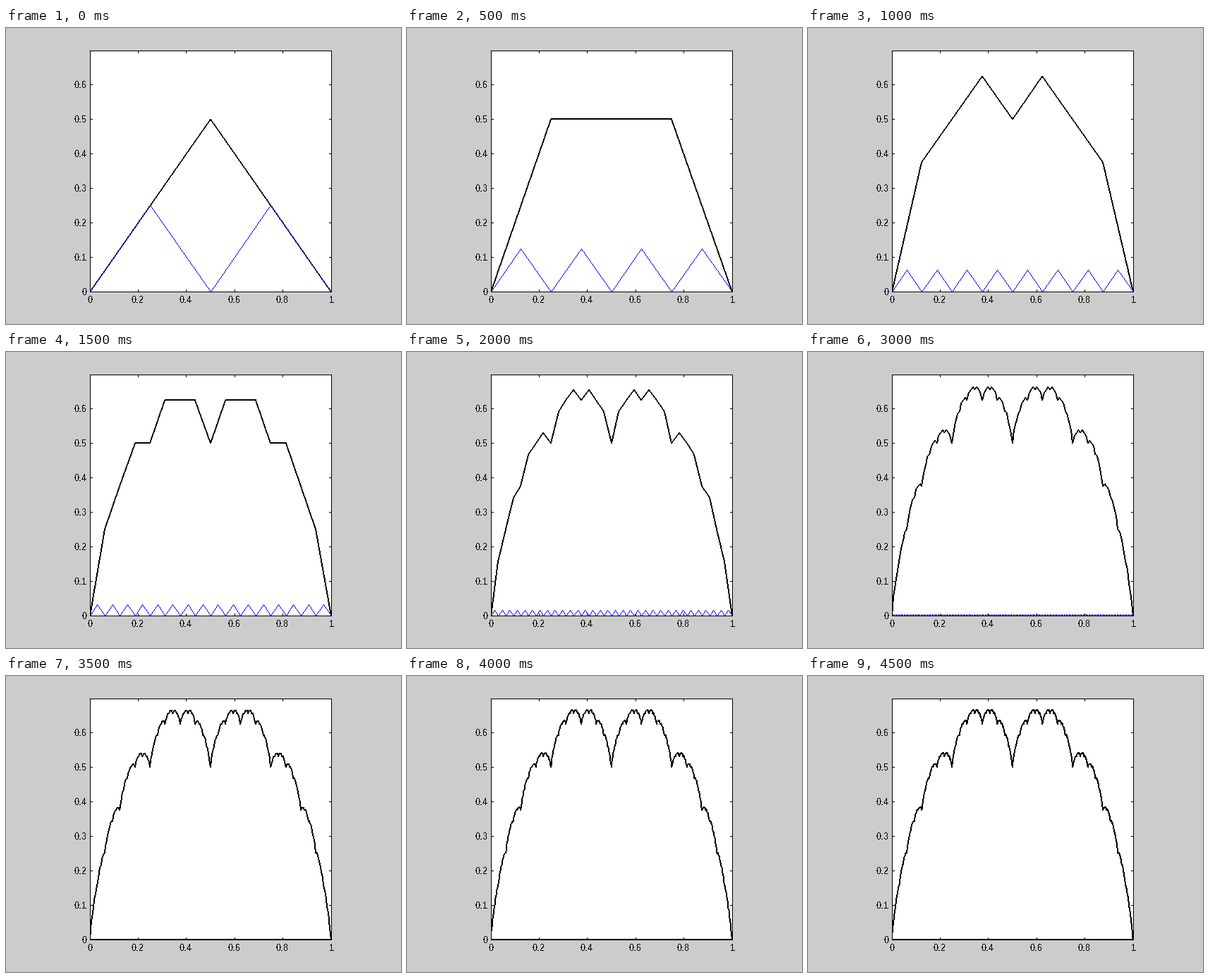
A matplotlib script that plays this animation: 560 by 420 pixels, repeating every 5000 ms.

```python
import numpy as np
import matplotlib.pyplot as plt
from matplotlib.animation import FuncAnimation

W, H, DPI = 560, 420, 96
LEFT, RIGHT, TOP, BOTTOM = 119, 461, 32, 374  # pixel lines of the axes box
TICK = 3
STEPS = 10
GREY, WHITE, BLACK, BLUE = (204,) * 3, (255,) * 3, (0,) * 3, (0, 0, 255)

plt.rcParams.update({
    "font.family": "Liberation Sans",
    "font.size": 13 * 72 / DPI,
    "text.antialiased": False,
    "text.hinting": "no_autohint",
    "text.hinting_factor": 1,
})


def to_px(x, y):
    """Pixel column and row of a data point."""
    col = np.floor(118.55 + 342.2 * np.asarray(x) + 0.5)
    row = np.floor(373.6 - 342 / 0.7 * np.asarray(y) + 0.5)
    return col.astype(int), row.astype(int)


def wave(x, n):
    """n-th triangle wave of the blancmange series."""
    t = x * 2**n
    return np.abs(t - np.round(t)) / 2**n


def plot(img, x, y, color, thick=False):
    """Draw a polyline without smoothing, one or two pixels wide."""
    cols, rows = to_px(x, y)
    for x0, y0, x1, y1 in zip(cols, rows, cols[1:], rows[1:]):
        dx, dy = x1 - x0, y1 - y0
        t = np.linspace(0, 1, max(abs(dx), abs(dy)) + 1)
        c = np.floor(x0 + dx * t + 0.5).astype(int)
        r = np.floor(y0 + dy * t + 0.5).astype(int)
        img[r, c] = color
        if thick and abs(dy) > abs(dx):
            img[r, np.maximum(c - 1, LEFT)] = color
        elif thick:
            img[r - 1, c] = color


def draw_box(img):
    img[[TOP, BOTTOM], LEFT:RIGHT + 1] = BLACK
    img[TOP:BOTTOM + 1, [LEFT, RIGHT]] = BLACK
    for c in xcols:
        img[TOP:TOP + TICK + 1, c] = BLACK
        img[BOTTOM - TICK:BOTTOM + 1, c] = BLACK
    for r in yrows:
        img[r, LEFT:LEFT + TICK + 1] = BLACK
        img[r, RIGHT - TICK:RIGHT + 1] = BLACK


def render(k):
    img = np.full((H, W, 3), GREY, dtype=np.uint8)
    img[TOP:BOTTOM + 1, LEFT:RIGHT + 1] = WHITE
    x = np.linspace(0, 1, 2**(k + 1) + 1)
    plot(img, x, sum(wave(x, n) for n in range(k + 1)), BLACK, thick=True)
    if k < 7:
        x = np.linspace(0, 1, 2**(k + 2) + 1)
        plot(img, x, wave(x, k + 1), BLUE)
    else:
        # A wave under a pixel high merges with the bottom axis.
        img[BOTTOM - 1, LEFT:RIGHT + 1] = BLACK
    draw_box(img)
    return img


xt = np.arange(6) / 5
yt = np.arange(7) / 10
xcols = to_px(xt, 0)[0]
yrows = to_px(0, yt)[1]

fig = plt.figure(figsize=(W / DPI, H / DPI), dpi=DPI)
ax = fig.add_axes([0, 0, 1, 1])
ax.axis("off")
view = ax.imshow(render(0), extent=(0, W, H, 0), aspect="auto",
                 interpolation="nearest")


def label(v, x, baseline, align):
    """Place a tick label by its advance width (digit 7, point 4)."""
    s = f"{v:g}"
    width = 7 if len(s) == 1 else 18
    ax.text(x - int(align * width), baseline, s, ha="left", va="baseline")


for v, c in zip(xt, xcols):
    label(v, c, BOTTOM + 16, 0.5)
for v, r in zip(yt, yrows):
    label(v, LEFT - 4, r + 5, 1)


def draw(k):
    view.set_data(render(k))
    return view,


anim = FuncAnimation(fig, draw, frames=STEPS, interval=500,
                     init_func=lambda: draw(0), repeat=True, repeat_delay=0)
plt.show()
```
